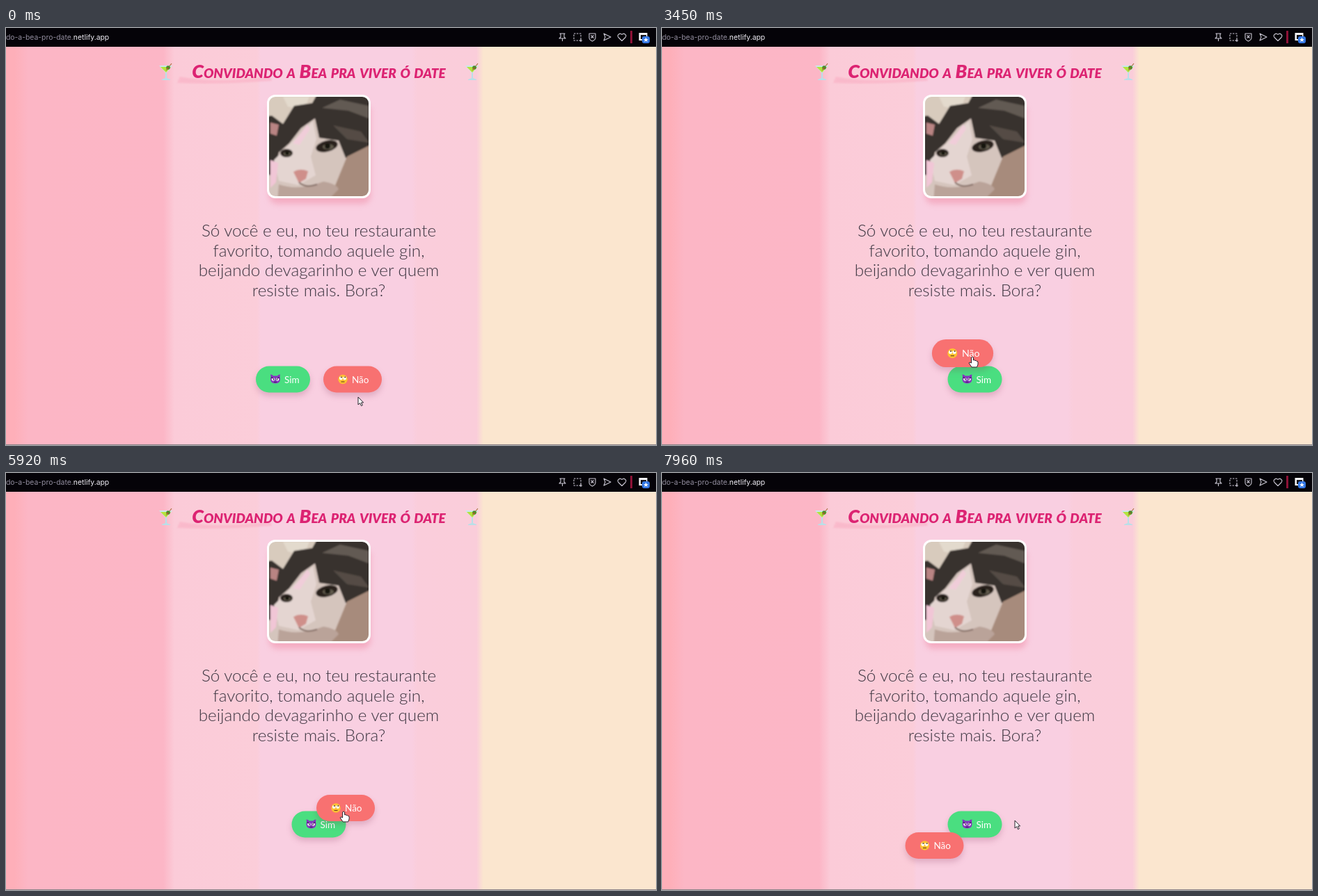
Write an HTML page that moves like this. It is 934x600 px and loops after 7.99 s.

```html
<!DOCTYPE html>
<html lang="pt-BR">
<head>
<meta charset="utf-8">
<title>Convite</title>
<style>
html, body { margin: 0; width: 100%; height: 100%; overflow: hidden; }
body {
  background: linear-gradient(90deg, #feafb9 12px, #fcb6c5 32px, #fcb6c6 226px, #fbcbd8 242px,
    #fbcdd9 361px, #f9cfe1 366px, #f9cfe1 583px, #facddb 591px, #facdda 676px, #fbe6cf 686px);
}
svg { display: block; }
text { font-family: Lato, sans-serif; font-weight: 300; }
.url { font: 10.4px Inter, sans-serif; fill: #f0eef5; }
.title { font-size: 27px; font-weight: 900; font-style: italic; font-variant: small-caps; fill: #dc2372; }
.body { font-size: 24.2px; fill: #3c3540; }
.label { font-size: 13.5px; font-weight: 400; fill: #fff; }
.mid { text-anchor: middle; }
.icons { fill: none; stroke: #c9c6d2; stroke-width: 1.1; stroke-linejoin: round; }
.button { filter: drop-shadow(0 5px 4px rgba(120, 30, 70, .2)); }
</style>
</head>
<body>
<svg width="934" height="600" viewBox="0 0 934 600">
  <defs>
    <clipPath id="photo"><rect x="378" y="99" width="143" height="143" rx="9"/></clipPath>
    <filter id="soft"><feGaussianBlur stdDeviation="1.3"/></filter>
    <filter id="blur"><feGaussianBlur stdDeviation="4"/></filter>
    <g id="drink">
      <path d="M-1-1V9L-6 11V12H6V11L1 9V-1Z" fill="#b9dfe8"/>
      <path d="M-10-9H9L0 2Z" fill="#c9e8ea"/>
      <path d="M-8-7H7L0 1Z" fill="#b4e33c"/>
      <path d="M0-2L8-12" stroke="#a4713c" stroke-width="1.2"/>
      <circle cx="3" cy="-6" r="2.8" fill="#4d8a2c"/><circle cx="2.3" cy="-5" r="1" fill="#e4392f"/>
    </g>
  </defs>

  <rect width="934" height="27" fill="#050308"/>
  <text class="url" x="0" y="17"><tspan fill="#918c9d">do-a-bea-pro-date.</tspan>netlify.app</text>
  <g class="icons">
    <path d="M796 8h7l-1 1v4l2 2h-9l2-2V9ZM799.500 15v4"/>
    <rect x="816" y="8" width="10" height="10" stroke-dasharray="2.5 1.5"/><path d="M824 18h4M826 16v4"/>
    <path d="M838 8h9v6q0 3-4.500 5-4.500-2-4.500-5ZM840.500 10.500l4 4m0-4l-4 4"/>
    <path d="M859 8l10 5-10 5 2-5Z"/>
    <path d="M885 18.500l-5-5a3 3 0 0 1 5-4 3 3 0 0 1 5 4Z"/>
  </g>
  <path d="M897 4h3v18h-3Z" fill="#8d1236"/>
  <path d="M909.500 7h12v11h-12Z" fill="#f4f4f6"/><path d="M912 10h8v6h-8Z" fill="#16151b"/>
  <rect x="914" y="12" width="11" height="10" rx="3" fill="#3478e5"/>
  <path d="M919.500 13.500l1 2.500h2.500l-2 1.500.8 2.500-2.300-1.500-2.300 1.500.8-2.500-2-1.500h2.500Z" fill="#fff"/>

  <path d="M250 70Q300 80 380 70L382 76Q300 82 246 79Z" fill="#f9a9bf" opacity=".5" filter="url(#soft)"/>
  <text class="title mid" x="449.500" y="72">Convidando a Bea pra viver ó date</text>
  <use href="#drink" x="230" y="63"/><use href="#drink" x="670" y="63"/>

  <rect x="378" y="108" width="146" height="145" rx="12" fill="#f08fa8" opacity=".55" filter="url(#blur)"/>
  <rect x="375" y="96" width="149" height="149" rx="12" fill="#fff"/>
  <g clip-path="url(#photo)"><g filter="url(#soft)">
    <path d="M370 90H530V250H370Z" fill="#d8cbbd"/>
    <path d="M370 170L405 150 438 125 470 150 525 170V250H370Z" fill="#d5c5bd"/>
    <path d="M398 99L436 99 428 118 405 113Z" fill="#e3dacd"/>
    <path d="M370 128L382 126 398 138 414 112 440 108 450 90H530V178L488 187 478 162 450 158 444 130 424 144 407 166 392 179 387 210 370 213Z" fill="#39332f"/>
    <path d="M380 136L392 139 389 155 380 152Z" fill="#b98483"/>
    <path d="M454 115L480 103 521 112V130L492 119Z" fill="#625a52"/>
    <path d="M470 140L510 149 522 165 490 160Z" fill="#554c45"/>
    <path d="M490 185L530 165V250H465L474 224Z" fill="#a78b7b"/>
    <path d="M408 167L428 147 441 134 446 160 438 185 445 212 420 226 392 220 385 190Z" fill="#e4d5d1"/>
    <path d="M380 190L391 194 388 222 380 230Z" fill="#f1c6d6"/>
    <path d="M412 166L433 139 437 145 422 168Z" fill="#f0cdd9"/>
    <path d="M392 225Q420 235 456 221 475 224 478 232L460 250H390Z" fill="#baa399"/>
    <path d="M413 207Q422 201 434 206L431 217 421 223Z" fill="#cf8f8a"/>
    <path d="M421 222Q430 231 447 225" fill="none" stroke="#826b63" stroke-width="2"/>
    <ellipse cx="403" cy="180" rx="9" ry="6" fill="#29231f"/>
    <ellipse cx="461" cy="170" rx="16" ry="8" fill="#29231f" transform="rotate(-14 461 170)"/>
    <ellipse cx="404" cy="181" rx="5" ry="3" fill="#635c4c"/>
    <ellipse cx="463" cy="171" rx="8" ry="4" fill="#625c4d"/>
    <circle cx="404" cy="180" r="3" fill="#17120f"/><circle cx="462" cy="170" r="4" fill="#17120f"/>
  </g></g>

  <g class="body mid">
    <text x="449.500" y="300">Só você e eu, no teu restaurante</text>
    <text x="449.500" y="328.700">favorito, tomando aquele gin,</text>
    <text x="449.500" y="357.400">beijando devagarinho e ver quem</text>
    <text x="449.500" y="386">resiste mais. Bora?</text>
  </g>

  <g id="yes" class="button">
    <rect id="yesFill" x="-39" y="-19" width="78" height="38" rx="19"/>
    <path d="M-18-7q3 0 4 2h6q1-2 4-2-1 3 0 6 0 7-7 7t-7-7q1-3 0-6Z" fill="#8436bd"/>
    <circle cx="-14" cy="0" r="2.200" fill="#fff"/><circle cx="-8" cy="0" r="2.200" fill="#fff"/>
    <path d="M-17-3l4 2M-5-3l-4 2M-13 4h4" stroke="#3f1661" stroke-width="1.200"/>
    <circle cx="-13.500" cy=".3" r=".9" fill="#321047"/><circle cx="-8.500" cy=".3" r=".9" fill="#321047"/>
    <text class="label" x="2" y="5">Sim</text>
  </g>
  <g id="no" class="button">
    <rect x="-42" y="-19" width="84" height="38" rx="19" fill="#f87171"/>
    <circle cx="-14" r="6.700" fill="#fdc132"/>
    <circle cx="-16.700" cy="-1.500" r="2.400" fill="#fff"/><circle cx="-11.300" cy="-1.500" r="2.400" fill="#fff"/>
    <circle cx="-16.200" cy="-2.900" r="1" fill="#5b3b1c"/><circle cx="-10.800" cy="-2.900" r="1" fill="#5b3b1c"/>
    <path d="M-16.500 3.500h5" stroke="#6b421b" stroke-width="1.100"/>
    <text class="label" x="-1" y="5">Não</text>
  </g>

  <g id="pointer" stroke-width="1" stroke-linejoin="round">
    <path id="arrow" d="M0 0V11L2.600 8.700 4.500 12.700 6.300 11.800 4.400 8H7.600Z" fill="#fff" stroke="#26222b"/>
    <path id="hand" d="M-1.500 1Q0-1 1.500 1V5Q3 4 4 5.500 5.500 5 6.200 6.500 8 6 8 8V11L6.500 15H-1L-5 9Q-4.500 7-1.500 9Z" fill="#fff" stroke="#26222b"/>
  </g>
  <path d="M0 599.500H934" stroke="#8d8489"/>
</svg>
<script>
const LOOP = 7990, MOVE = 290, FIRST_HOVER = 110;
const el = id => document.getElementById(id);
const clamp = v => Math.max(0, Math.min(1, v));
const ease = u => u * u * (3 - 2 * u);
const mix = (a, b, u) => a + (b - a) * u;

// [time the escape starts, target x, target y]
const escapes = [
  [-MOVE, 498, 505.5], [FIRST_HOVER, 366, 439], [400, 403.5, 550], [1560, 504, 512],
  [2240, 396, 503], [2800, 432, 462], [3160, 432, 468], [3560, 480, 488],
  [3860, 419, 484], [4170, 482, 496], [4500, 427, 442], [4850, 448, 483],
  [5250, 500, 486], [5640, 488, 482], [5950, 390, 481], [6250, 461, 524],
  [6860, 450, 546], [7190, 497, 460], [7600, 391.5, 536]
];
// [time, tip x, tip y]
const cursorPath = [
  [0, 506, 531], [110, 500, 521], [400, 402, 455], [620, 405, 483], [1070, 405, 483],
  [1560, 410, 533], [1850, 440, 520], [2100, 478, 504], [2260, 478, 504], [2800, 425, 500],
  [3150, 440, 480], [3450, 446, 473], [3600, 446, 473], [3860, 470, 483], [4170, 430, 484],
  [4500, 470, 490], [4850, 440, 455], [5180, 463, 474], [5270, 463, 474], [5640, 490, 484],
  [5950, 485, 487], [6250, 410, 480], [6550, 417, 477], [6860, 450, 510], [7190, 458, 532],
  [7520, 490, 472], [7640, 500, 470], [7960, 507, 500], [7990, 507, 500]
];
const yesHovers = [[1900, 2700], [6820, 7150]];
const noHovers = [[1480, 1640], [3160, 3640], [4930, 5330]];

function locate(path, t, shift, duration) {
  const i = Math.max(1, path.findLastIndex(p => p[0] - shift <= t) + (shift ? 0 : 1));
  const [a, b] = [path[i - 1], path[Math.min(i, path.length - 1)]];
  const u = ease(clamp(duration ? (t - b[0]) / duration : (t - a[0]) / (b[0] - a[0] || 1)));
  return [mix(a[1], b[1], u), mix(a[2], b[2], u)];
}
const hover = (spans, t) =>
  Math.max(...spans.map(([a, b]) => clamp((t - a) / 150) * clamp((b - t) / 150)));
const inside = (p, c, w) => Math.abs(p[0] - c[0]) < w / 2 && Math.abs(p[1] - c[1]) < 19;
const place = (id, [x, y], scale = 1) =>
  el(id).setAttribute('transform', `translate(${x} ${y}) scale(${scale})`);

function draw(now) {
  const t = now % LOOP;
  const no = locate(escapes, t, 1e-6, MOVE), tip = locate(cursorPath, t, 0);
  const yes = [t < FIRST_HOVER ? 398 : 449.5, 505.5];
  const lit = hover(yesHovers, t);
  place('yes', yes, 1 + .05 * lit);
  place('no', no, 1 + .05 * hover(noHovers, t));
  place('pointer', tip);
  el('yesFill').setAttribute('fill',
    `rgb(${mix(74, 21, lit)},${mix(222, 128, lit)},${mix(128, 61, lit)})`);
  const over = inside(tip, yes, 78) || inside(tip, no, 84);
  el('hand').style.display = over ? '' : 'none';
  el('arrow').style.display = over ? 'none' : '';
  requestAnimationFrame(draw);
}
requestAnimationFrame(draw);
</script>
</body>
</html>
```
